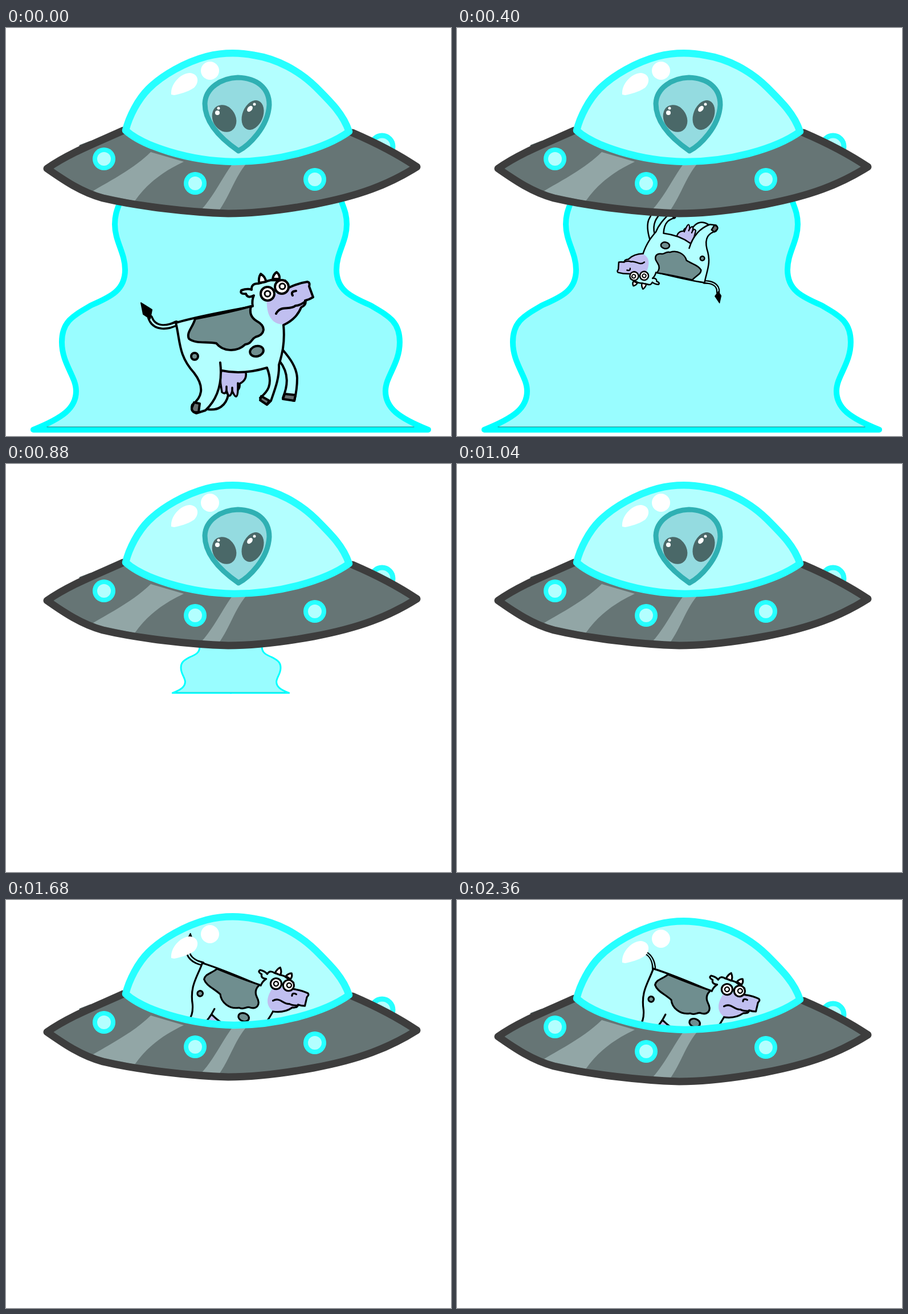
An HTML page that plays this animation: 781 by 717 pixels, repeating every 2.4 s.

```html
<!DOCTYPE html>
<html lang="en">
<head>
<meta charset="utf-8">
<title>Cow abduction</title>
<style>
  html, body { margin: 0; width: 100%; height: 100%; overflow: hidden; background: #fff; }
  svg { display: block; width: 781px; height: 717px; }
</style>
</head>
<body>
<svg viewBox="0 0 781 717" stroke-linejoin="round" stroke-linecap="round" fill="none">
  <defs>
    <path id="domeShape" d="M210 180C216 155 232 125 250 107C275 82 315 60 352 50C380 43 410 43 436 48C475 54 515 75 544 104C572 132 592 152 602 182C560 212 480 235 400 235C320 234 240 207 210 180Z"/>
    <clipPath id="domeClip"><use href="#domeShape"/></clipPath>

    <path id="beamHalf" fill="#99fdff" stroke="#0ff" stroke-width="10"
      d="M396 706H48C100 685 123 668 123 638C123 612 98 590 98 552C98 515 118 506 150 487C185 472 209 460 209 425C209 395 191 375 191 345C191 325 197 315 202 300H396"/>

    <g id="lamp">
      <circle r="20" fill="#26ffff"/>
      <circle r="12" fill="#b3ffff"/>
    </g>

    <g id="cow" stroke="#000" stroke-width="4">
      <g class="tail">
        <path stroke-width="10" d="M299 519C282 528 260 529 253 509"/>
        <path stroke="#b3ffff" stroke-width="3" d="M303 518C282 528 260 529 253 509"/>
        <path fill="#000" stroke-width="2" d="M237 483L256 495L253 511L241 503Z"/>
      </g>
      <!-- far legs -->
      <path fill="#b3ffff" d="M486 566C498 580 510 596 511 615C511 630 509 643 506 655L486 650C494 630 498 608 480 585"/>
      <path fill="#666f70" d="M489 643L508 645L506 655L486 652Z"/>
      <path fill="#b3ffff" d="M354 670C372 673 386 664 390 645L378 625"/>
      <path fill="#c0bff0" stroke-width="3.5" d="M378 602C374 620 378 632 379 640Q385 645 387 637Q392 655 397 638Q406 658 407 636Q411 632 410 625Q425 618 420 601Z"/>
      <path stroke-width="3.5" d="M387 637V630M397 638V632M407 636V624"/>
      <!-- body and near legs -->
      <path fill="#b3ffff" stroke="none" d="M298 518Q340 506 430 490L434 453L492 446L497 500L487 522C490 555 484 575 479 592C479 615 470 640 463 660L446 650C458 640 470 628 458 597Q415 610 379 602C381 630 368 655 350 672L327 662C345 650 350 632 330 606C300 575 308 548 298 518Z"/>
      <path d="M430 490Q340 506 298 518C306 550 302 575 330 606C350 632 343 650 327 662Q323 674 334 677L350 672C368 655 381 630 376 588M379 602Q415 610 458 597C470 628 458 640 446 650L459 661L465 655C472 635 480 615 479 592C484 575 490 555 487 522"/>
      <path fill="#666f70" d="M330 658L340 660L338 675Q326 677 326 668ZM448 647L462 655L458 662L446 654Z"/>
      <path fill="#6f8e8f" d="M332 511Q390 500 430 489C427 500 430 509 440 515C458 525 454 539 438 543C431 546 431 555 420 556C404 571 380 568 369 554C350 551 332 555 321 546C316 535 328 526 332 511Z"/>
      <ellipse cx="440" cy="568" rx="12" ry="9" fill="#6f8e8f" transform="rotate(-15 440 568)"/>
      <circle cx="331" cy="577" r="6" fill="#6f8e8f"/>
      <!-- head -->
      <path fill="#c0bff0" stroke="none" d="M458 474C456 500 464 521 487 521C500 514 510 504 516 493L526 482L538 473L532 447L497 456Z"/>
      <path fill="#b3ffff" d="M433 489Q431 479 435 470Q424 476 421 467Q410 468 413 461Q424 457 431 460Q430 449 443 449L465 443L490 444"/>
      <path fill="#fff" d="M444 448Q443 438 447 432Q456 438 456 446ZM468 441Q469 433 475 429Q481 434 480 441Z"/>
      <path d="M497 456Q514 448 529 446Q534 447 532 454L539 473Q533 477 525 479Q528 486 518 491C512 506 500 516 487 522M474 502C482 486 498 497 508 488Q516 488 526 480M509 462Q499 463 503 470"/>
      <circle cx="459" cy="467" r="12" fill="#fff"/>
      <circle cx="484" cy="455" r="12" fill="#fff"/>
      <circle cx="459" cy="467" r="5" stroke-width="3"/>
      <circle cx="485" cy="454" r="5" stroke-width="3"/>
    </g>
  </defs>

  <g id="beam">
    <use href="#beamHalf"/>
    <use href="#beamHalf" transform="matrix(-1 0 0 1 789 0)"/>
    <path stroke="#0a5555" stroke-width=".8" d="M72 701H716"/>
  </g>
  <use id="risingCow" href="#cow"/>

  <g id="ship">
    <path stroke="#4a5858" stroke-width="3" d="M130 207L148 200"/>
    <circle cx="660" cy="208" r="19" fill="#b3ffff" stroke="#26ffff" stroke-width="9"/>
    <path fill="#667575" d="M72 247C110 220 160 201 206 180L608 184C650 202 688 222 721 244C672 275 620 295 540 310C480 321 430 326 390 326C320 324 230 313 170 299C130 288 98 265 72 247Z"/>
    <path fill="#92a6a6" d="M150 288C180 270 225 247 254 218L312 235C280 250 250 270 226 304ZM343 319C365 295 380 262 398 238L422 238C400 265 395 290 374 321Z"/>
    <path stroke="#3d3d3d" stroke-width="13" d="M206 180C160 201 110 220 72 247C98 265 130 288 170 299C230 313 320 324 390 326C430 326 480 321 540 310C620 295 672 275 721 244C688 222 650 202 608 184"/>
    <use href="#lamp" x="172" y="230"/>
    <use href="#lamp" x="332" y="273"/>
    <use href="#lamp" x="542" y="266"/>
    <use href="#domeShape" fill="#b3ffff"/>
    <g id="alien">
      <path fill="#94dbe0" stroke="#2fb0b3" stroke-width="9" d="M408 216C395 207 349 175 349 133C350 105 378 88 407 87C440 88 462 105 462 135C460 175 425 207 408 216Z"/>
      <g fill="#4a6868">
        <ellipse cx="383" cy="159" rx="20" ry="25" transform="rotate(-30 383 159)"/>
        <ellipse cx="433" cy="153" rx="18" ry="27" transform="rotate(22 433 153)"/>
      </g>
      <g fill="#fff">
        <circle cx="373" cy="141" r="2.5"/>
        <circle cx="371" cy="149" r="4"/>
        <ellipse cx="428" cy="142" rx="4" ry="6" transform="rotate(40 428 142)"/>
        <circle cx="436" cy="134" r="2.5"/>
      </g>
    </g>
    <g clip-path="url(#domeClip)"><use id="ridingCow" href="#cow"/></g>
    <g fill="#fff">
      <circle cx="358" cy="75" r="16"/>
      <path d="M290 117C288 100 305 80 322 79C338 80 340 95 330 105C318 113 305 116 295 118Z"/>
    </g>
    <use href="#domeShape" stroke="#26ffff" stroke-width="12.5"/>
  </g>
</svg>
<script>
  const LOOP = 2400, STEP = 40;
  const SWAP = 1400, BEAM_OFF = 720, BEAM_GONE = 960;
  const BOB = [0, 0, -7, -15, -7];
  const el = id => document.getElementById(id);
  const tail = document.querySelector('.tail');
  const show = (id, on) => el(id).setAttribute('visibility', on ? 'visible' : 'hidden');
  const move = (id, transform) => el(id).setAttribute('transform', transform);
  const poseCow = (id, x, y, angle, scale) =>
    move(id, `translate(${x} ${y}) rotate(${angle}) scale(${scale}) translate(-385 -527)`);

  function draw(t) {
    const bob = BOB[Math.floor(t % 300 / 60)];
    const riding = t >= SWAP;
    move('ship', `translate(0 ${bob})`);

    // The beam flares as the ship lifts, then withdraws into the hull.
    const open = t < BEAM_OFF ? 1 : Math.max(0, (BEAM_GONE - t) / 280);
    const flare = -bob / 15;
    show('beam', open > 0);
    move('beam', `translate(394.5 280) scale(${open * (1 + .07 * flare)} ${open * (1 + .012 * flare)}) translate(-394.5 -280)`);

    // A steady spin and shrink while the climb speeds up.
    show('risingCow', t < BEAM_OFF);
    poseCow('risingCow', 385 + t * .004, 527 - .171 * t - 2.42e-4 * t * t,
      1.41 * t, Math.exp(-t / 870));

    show('alien', !riding);
    show('ridingCow', riding);
    const ride = t - 1680;
    poseCow('ridingCow', 398.5, 169.7 - 3 * Math.sin(2 * Math.PI * ride / 360), 33.3, .796);

    // The tail whips: it swings and its bend flips across its own axis.
    const whip = riding ? Math.cos(2 * Math.PI * ride / 260) : 1;
    const swing = riding ? 15 * whip - 10 : 0;
    tail.setAttribute('transform',
      `translate(298 518) rotate(${swing + 30}) scale(1 ${whip}) rotate(-30) translate(-298 -518)`);
  }

  function frame() {
    draw(Math.floor(performance.now() % LOOP / STEP) * STEP);
    requestAnimationFrame(frame);
  }
  frame();
</script>
</body>
</html>
```
